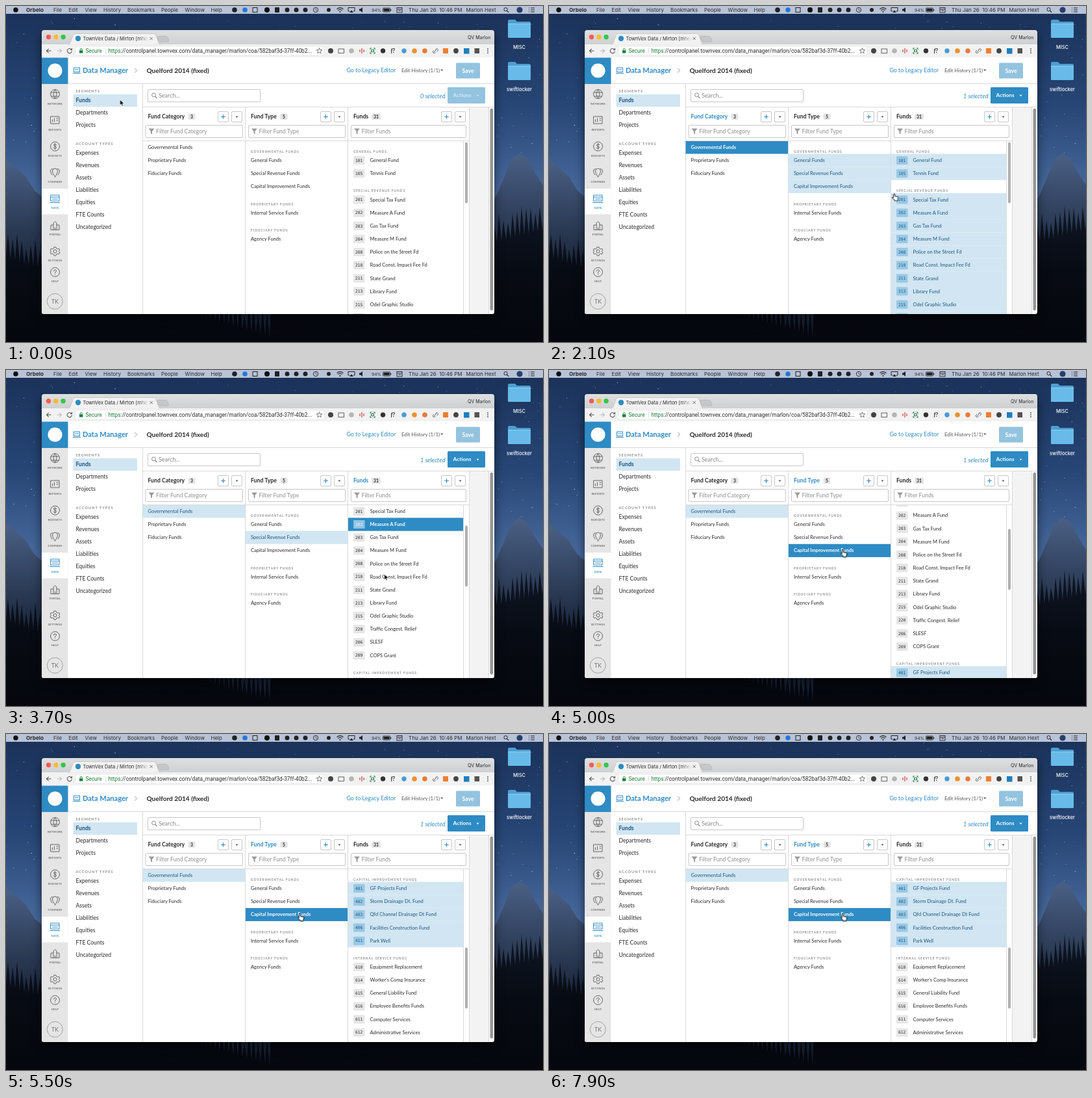
These frames come from a looping animation (827 by 517 pixels, 8000 ms). An HTML page:

```html
<!DOCTYPE html>
<html lang="en">
<head>
<meta charset="utf-8">
<title>Data Manager</title>
<style>
html, body { margin: 0; width: 100%; height: 100%; overflow: hidden; background: #05080f; }
svg { display: block; width: 827px; height: 517px; font-family: Lato, sans-serif; fill: none; }
text { fill: #2b2b2b; white-space: pre; }
.b { font-weight: 700; }
.i { font-style: italic; }
.mid { text-anchor: middle; }
.end { text-anchor: end; }
.ui { font-family: Inter, sans-serif; }
.url { font-family: Roboto, sans-serif; }
.mono { font-family: "DejaVu Sans Mono", monospace; }
.caps { font-weight: 700; fill: #8b8b8b; letter-spacing: 1px; }
.icon { stroke: #666; stroke-width: 1; stroke-linejoin: round; stroke-linecap: round; }
.row .bg { fill: var(--bg); }
.row .tag { fill: var(--tag); }
.row text { fill: var(--fg); }
.row .name { font-weight: var(--w); }
.head { fill: var(--fg); font-weight: 700; }
.scroll { animation: scroll 8s infinite cubic-bezier(.37,0,.63,1); }
.thumb { animation: thumb 8s infinite cubic-bezier(.37,0,.63,1); }
.cursor { animation: move 8s infinite ease-in-out; }
.on { animation: on 8s step-end infinite; }
.off { animation: off 8s step-end infinite; }
.arrow { animation: arrow 8s step-end infinite; }
.hand { animation: hand 8s step-end infinite; }
@keyframes scroll {
  0%, 39.5% { transform: translateY(0); }
  45.75%, 61.55% { transform: translateY(-80.6px); }
  67.8%, 100% { transform: translateY(-322.4px); }
}
@keyframes thumb {
  0%, 39.5% { transform: translateY(0); }
  45.75%, 61.55% { transform: translateY(29.8px); }
  67.8%, 100% { transform: translateY(119px); }
}
@keyframes move {
  0%, 5% { transform: translate(175.5px, 144px); }
  14% { transform: translate(262px, 216px); }
  19.5% { transform: translate(262px, 216px); animation-timing-function: ease-in; }
  26.25% { transform: translate(531.5px, 288.5px); animation-timing-function: ease-out; }
  31%, 51% { transform: translate(582.5px, 314px); }
  58.5%, 100% { transform: translate(452.5px, 276.5px); }
}
@keyframes on { 0% { opacity: 0; } 16.25%, 100% { opacity: 1; } }
@keyframes off { 0% { opacity: 1; } 16.25%, 100% { opacity: 0; } }
@keyframes arrow { 0% { opacity: 1; } 13% { opacity: 0; } 42.5% { opacity: 1; } 52%, 100% { opacity: 0; } }
@keyframes hand { 0% { opacity: 0; } 13% { opacity: 1; } 42.5% { opacity: 0; } 52%, 100% { opacity: 1; } }
</style>
</head>
<body>
<svg id="stage" viewBox="0 0 827 517">
  <defs>
    <linearGradient id="sky" x2="0" y2="1">
      <stop offset="0" stop-color="#1a3158"/><stop offset=".3" stop-color="#274676"/>
      <stop offset=".55" stop-color="#48699c"/><stop offset=".75" stop-color="#40597f"/>
      <stop offset="1" stop-color="#0a1120"/>
    </linearGradient>
    <linearGradient id="rock" x2="0" y2="1">
      <stop offset="0" stop-color="#4a6085"/><stop offset="1" stop-color="#141e30"/>
    </linearGradient>
    <linearGradient id="ground" x2="0" y2="1">
      <stop offset="0" stop-color="#101826"/><stop offset=".5" stop-color="#070b13"/>
      <stop offset="1" stop-color="#05070d"/>
    </linearGradient>
    <linearGradient id="fade"><stop stop-color="#f2f2f2" stop-opacity="0"/><stop offset="1" stop-color="#f2f2f2"/></linearGradient>
    <linearGradient id="bar" x2="0" y2="1"><stop stop-color="#dedfe0"/><stop offset="1" stop-color="#cfd0d2"/></linearGradient>
    <filter id="shadow" x="-10%" y="-10%" width="120%" height="125%"><feGaussianBlur stdDeviation="8"/></filter>
    <clipPath id="win"><path d="M55 41a4 4 0 0 1 4-4h689a4 4 0 0 1 4 4v430a3 3 0 0 1-3 3H58a3 3 0 0 1-3-3z"/></clipPath>
    <clipPath id="list"><path d="M527 208h178v266h-178z"/></clipPath>
    <clipPath id="tab"><path d="M110 40h109v18h-109z"/></clipPath>
  </defs>
</svg>
<script>
const BLUE = '#2e8bc4', PALE = '#d1e6f2', LINE = '#d9d9d9';
const T = (x, y, s, size, cls = '', more = '') =>
  `<text x="${x}" y="${y}" font-size="${size}" class="${cls}" ${more}>${s}</text>`;
const R = (x, y, w, h, fill, more = '') =>
  `<rect x="${x}" y="${y}" width="${w}" height="${h}" fill="${fill}" ${more}/>`;
const C = (x, y, r, fill, more = '') => `<circle cx="${x}" cy="${y}" r="${r}" fill="${fill}" ${more}/>`;
const P = (d, more = '') => `<path d="${d}" ${more}/>`;
const box = (x, y, w, h, stroke = '#c6c6c6') => R(x, y, w, h, '#fff', `stroke="${stroke}" rx="1.5"`);
const fill = c => `fill="${c}"`;
const line = (c, w = 1) => `stroke="${c}" stroke-width="${w}"`;

// Row looks (plain, lit, chosen, blue heading) over four phases of the loop.
const looks = [
  '--bg:transparent;--fg:#2b2b2b;--tag:#e6e6e6;--w:400',
  `--bg:${PALE};--fg:#1d5580;--tag:#98c8e5;--w:400`,
  `--bg:${BLUE};--fg:#fff;--tag:#8fc3e3;--w:700`,
  `--fg:${BLUE}`
];
const starts = [0, 16.25, 38.75, 61.25];
const used = new Set();
const phase = p => (used.add(p), 'p' + p);
const phaseCss = p => `@keyframes p${p}{${[...p].map((d, i) => `${starts[i]}%{${looks[d]}}`).join('')}` +
  `100%{${looks[p[3]]}}}.p${p}{animation:p${p} 8s step-end infinite}`;

function wallpaper() {
  let seed = 7;
  const rnd = () => (seed = (seed * 16807) % 2147483647) / 2147483647;
  let out = R(0, 0, 827, 517, 'url(#sky)');
  for (let i = 0; i < 420; i++)
    out += C((rnd() * 827).toFixed(1), (rnd() * 250).toFixed(1), (.25 + rnd() * .45).toFixed(2), '#cfdcf2', `opacity="${(.3 + rnd() * .6).toFixed(2)}"`);
  out += P('M0 236L14 248L30 262L44 284L60 298V420H0z', fill('url(#rock)'));
  out += P('M740 318L756 290L768 262L778 236L790 227L803 234L813 254L827 276V420H740z', fill('url(#rock)'));
  let d = 'M0 517V385';
  for (let x = 0; x < 827; x += 7) {
    const y = x < 400 ? 378 + x * .3 : 350 - (x - 752) * .25;
    d += `L${x + 3} ${(y - 12 - rnd() * 22).toFixed(1)}L${x + 7} ${(y + 12).toFixed(1)}`;
  }
  return out + P(d + 'V517z', fill('url(#ground)'));
}

function folder(y, name) {
  return P(`M773 ${y + 4}v-2a2 2 0 0 1 2-2h9l3 3h19a2 2 0 0 1 2 2v4h-35z`, fill('#4c9fd2')) +
    R(773, y + 6, 35, 22, '#68bbe8', 'rx="1.5"') + R(773, y + 6, 35, 1, '#8fd0f2') +
    T(790.5, y + 45, name, 7.4, 'ui mid', 'style="fill:#fff;font-weight:500"');
}

function menuBar() {
  let out = R(0, 0, 827, 12, '#b9c3d6') + C(15, 6, 3.8, '#111') + T(31, 9, 'Orbelo', 8.2, 'ui b');
  const menu = { File: 73, Edit: 96.5, View: 121.5, History: 150, Bookmarks: 187, People: 239, Window: 275.5, Help: 315.5 };
  for (const k in menu) out += T(menu[k], 9, k, 7.95, 'ui');
  out += C(352, 6, 3.8, '#222') + C(368, 6, 3.8, '#2378d8');
  out += R(380, 2.5, 7, 7, 'none', line('#222')) + C(402, 6, 4, '#111') + R(414, 2, 7, 8, '#222', 'rx="1"');
  [433, 447, 461].forEach(x => out += C(x, 6, 3.5, '#222'));
  out += C(477, 6, 3.7, 'none', line('#333')) + P('M477 3.5V6l2 1', line('#333', .8)) + C(497, 6, 3, '#222');
  out += P('M509.5 4.8q5-4.4 10 0M511.2 6.8q3.3-2.8 6.6 0', line('#222', 1.1)) + C(514.5, 9, 1.1, '#222');
  out += P('M529 8h-2V2.5h10V8h-2', line('#222')) + P('M532 6.5l3 3.5h-6z', fill('#222'));
  out += P('M544 4.5h2l3-2.5v8l-3-2.5h-2z', fill('#222')) + T(563, 8.7, '94%', 6.7, 'ui');
  out += R(580.5, 3, 11, 6.2, 'none', line('#222', .8) + ' rx="1"') + R(581.5, 4, 9, 4.2, '#222') + R(592.3, 4.8, 1, 2.6, '#222');
  out += R(602, 2.5, 8, 7.5, 'none', line('#222', .9)) + P('M602 5h8M604.5 7h3.5', line('#222', .9));
  out += T(620, 9, 'Thu Jan 26  10:46 PM', 8, 'ui') + T(708.5, 9, 'Marlon Hext', 8, 'ui');
  out += C(769.5, 5.2, 2.6, 'none', line('#222')) + P('M771.5 7.2l2.7 2.7', line('#222', 1.2)) + C(791, 6, 4.6, '#27406f');
  return out + P('M805 3h1M808 3h6M805 6h1M808 6h6M805 9h1M808 9h6', line('#222', 1.1));
}

function browser() {
  let out = R(55, 37, 697, 22, 'url(#bar)') + R(55, 59, 697, 20.5, '#f2f2f2');
  ['#fc5b57', '#fdbb2f', '#33c748'].forEach((c, i) => out += C(65.5 + i * 11.3, 47.8, 3.7, c));
  out += P('M95 59.5q3 0 4-3l4-11q1-3 4-3h120q3 0 4 3l4 11q1 3 4 3z', fill('#f2f2f2') + line('#b5b5b5', .6));
  out += R(94, 59.2, 150, 2, '#f2f2f2') + C(111, 50, 4.2, BLUE);
  out += `<g clip-path="url(#tab)">${T(118.5, 52.7, 'TownVex Data / Mirton [mhext]', 7.4, 'ui')}</g>` + R(203, 44, 17, 12, 'url(#fade)');
  out += P('M221.5 47.8l4.4 4.4m0-4.4l-4.4 4.4', line('#666', .9));
  out += P('M234 46.5h12q2 0 3 2l2 4.5q.5 2-1.500 2h-12q-2 0-2.500-2l-2-4.500q-.5-2 1-2z', fill('#c6c7c9') + line('#adadad', .6));
  out += T(746.5, 50.5, 'QV Marlon', 7.1, 'ui end');
  out += P('M69.500 69h-7m3.200-3.200L62.500 69l3.200 3.200', line('#555', 1.1)) + P('M78.500 69h7m-3.200-3.200L85.500 69l-3.200 3.200', line('#bbb', 1.1));
  out += P('M100.800 67a3.600 3.600 0 1 0 .6 2.500M101.500 65v2.500H99', line('#555', 1.1));
  out += R(107, 62, 383, 14, '#fff', line('#ddd', .6) + ' rx="2"');
  out += R(113, 68.300, 5.400, 4.200, '#188038', 'rx=".5"') + P('M114.200 68.500v-1.500a1.500 1.500 0 0 1 3 0v1.500', line('#188038', .9));
  out += T(122.5, 71.8, 'Secure', 8.2, 'url', 'style="fill:#188038"') + P('M153.500 64.500v9', line('#ddd'));
  out += T(157.500, 71.8, '<tspan fill="#188038">https</tspan>://controlpanel.townvex.com/data_manager/marlon/coa/582baf3d-37ff-40b2...', 8.4, 'url');
  out += P('M482.500 64.600l1.200 2.900 3.100.2-2.400 2 .8 3-2.700-1.600-2.700 1.600.8-3-2.400-2 3.100-.2z', line('#555', .8));
  out += C(500, 69, 4, '#444') + R(512, 66, 8.500, 6.500, 'none', line('#666')) + C(532, 69, 3.8, '#b5b5b5');
  out += P('M545 67v4M548 65v8M551 67v4', line('#d5504a', 1.3)) + P('M561 67v-2h2M566 65h2v2M568 71v2h-2M563 73h-2v-2M562.500 67.500h4v3h-4z', line('#2e7d4f', 1.1));
  out += C(580.500, 69, 3.7, '#333') + T(592.500, 72, 'f?', 8.500, 'i b') + C(613, 69, 3.7, '#4a9ad4') + C(629, 69, 3.8, '#e8922f') + C(645, 69, 3.8, '#ec7a35');
  out += P('M659 71l4-4M659 68l-1.200 1.200a1.900 1.900 0 0 0 2.700 2.700l1.200-1.200M661 67.500l1.200-1.200a1.900 1.900 0 0 1 2.700 2.700L663.500 70.200', line('#555', .9));
  out += R(673, 65, 8, 8, '#ef7d32') + C(693, 69, 3.9, '#444') + R(705, 65, 8.500, 8.500, '#1d7fbf') + R(721.500, 65, 7.500, 8, '#555');
  return out + [66, 69, 72].map(y => C(742, y, .9, '#555')).join('');
}

function rail() {
  let out = R(55, 120, 40.500, 354, '#e5e5e5') + R(55, 79.500, 40.500, 40.500, BLUE) + C(75.500, 99.500, 11, '#fff') + R(55, 281, 40.500, 39.500, '#fff');
  const icons = [
    'M68.500 135.500a7 7 0 1 0 14 0a7 7 0 1 0-14 0M69 133h13M70 139h11M75.500 128.500q-5 7 0 14q5-7 0-14',
    'M69 170h13v11H69zM71.500 178v-3M74.500 178v-5M78 173h2M78 176h2',
    'M68.500 216a7 7 0 1 0 14 0a7 7 0 1 0-14 0M77.800 213.500q-4-2-4.500.7c0 2 4.500 1.200 4.500 3.400q-.8 2.500-4.800.6M75.500 211.500v9',
    'M75.500 263q-4-6-4-9a4 4 0 0 1 8 0q0 3-4 9M71 260q-3-4-2.500-7q.5-2 3-2.500M80 260q3-4 2.500-7q-.5-2-3-2.500',
    'M69 291h13v9H69zM69 294h13M68 302.500h15M71.500 297h8',
    'M69 344v-7h4v-3l2.500-2.500 2.500 2.500v3h4v7zM73 344v-7M78 344v-7M75.500 344v-3',
    'M73 377.500a2.500 2.500 0 1 0 5 0a2.500 2.500 0 1 0-5 0M74 371h3l.6 2 2.200 1 2-.6 1 2.600-1.500 1.500 1.500 1.600-1 2.600-2-.6-2.200 1-.6 2h-3l-.6-2-2.200-1-2 .6-1-2.600 1.500-1.600-1.500-1.500 1-2.600 2 .6 2.200-1z',
    'M68.500 409.500a7 7 0 1 0 14 0a7 7 0 1 0-14 0M73.500 408q0-2 2-2t2 1.800q0 1-2 2.200v1M75.500 413v.2'
  ];
  const labels = ['NETWORK', 'REPORTS', 'BUDGETS', 'COMPARE', 'DATA', 'PORTAL', 'SETTINGS', 'HELP'];
  const ys = [151.500, 191.500, 231.700, 272, 312, 352.500, 392.800, 425];
  labels.forEach((s, i) => {
    const c = i === 4 ? BLUE : '#666';
    out += P(icons[i], `class="icon" style="stroke:${c}"`) + T(75.500, ys[i], s, 4.100, 'b mid', `style="fill:${c};letter-spacing:.3px"`);
  });
  return out + C(75.300, 454.500, 12, 'none', line('#999', .9)) + T(75.300, 457.700, 'TK', 9, 'mid', 'style="fill:#777"');
}

function page() {
  let out = R(55, 79, 697, 395, '#fff') + rail();
  out += R(104.500, 95, 9, 6.500, 'none', line(BLUE)) + P('M103 103.500h12M106 98h6', line(BLUE));
  out += T(118, 103, 'Data Manager', 11.100, 'b', `style="fill:${BLUE}"`) + P('M198.500 96l3 3.300-3 3.300', line('#999'));
  out += T(216.500, 102.600, 'Quelford 2014 (fixed)', 10.100, 'b');
  out += T(524.500, 102.200, 'Go to Legacy Editor', 8.800, '', `style="fill:${BLUE}"`) + T(609, 102.200, 'Edit History (1/1)', 7.800, '', 'style="fill:#555"');
  out += P('M669 97.500h4.500l-2.250 2.800z', fill('#666')) + R(693, 87.500, 37, 24, '#93c3df', 'rx="1.500"') + T(711.500, 102.500, 'Save', 8.700, 'b mid', 'style="fill:#fff"');
  out += P('M95.500 119.500H752M210.500 120V474M211 155.500H752', line(LINE));

  out += T(107.500, 132.800, 'SEGMENTS', 5.600, 'caps') + T(107.500, 213.800, 'ACCOUNT TYPES', 5.600, 'caps') + R(103.500, 136, 98.500, 19, PALE);
  out += T(107.500, 148.100, 'Funds', 8.700, 'b', 'style="fill:#1d4f7a"');
  ['Departments', 'Projects'].forEach((s, i) => out += T(107.500, 167.100 + i * 19, s, 8.600));
  ['Expenses', 'Revenues', 'Assets', 'Liabilities', 'Equities', 'FTE Counts', 'Uncategorized']
    .forEach((s, i) => out += T(107.500, 229.100 + i * 19, s, 8.600));

  out += box(218.500, 128.500, 173, 19) + C(227.500, 136.800, 2.900, 'none', line('#888')) + P('M229.600 139l2.900 2.900', line('#888', 1.200));
  out += T(235, 141, 'Search...', 9, '', 'style="fill:#888"');
  ['off', 'on'].forEach((cls, i) => {
    const act = cls === 'on';
    out += `<g class="${cls}">${T(676.500, 142, i + ' selected', 9.200, 'i end', `style="fill:${BLUE}"`)}` +
      R(680, 125, 58, 25, act ? BLUE : '#93c3df', 'rx="1.500"') +
      `<g opacity="${act ? 1 : .6}">${T(688.500, 140.300, 'Actions', 8.300, 'b', 'style="fill:#fff"')}${P('M724.500 136.800h4l-2 2.500z', fill('#fff'))}</g></g>`;
  });
  return out;
}

const slot = i => 217.4 + 20.15 * i;

function row(x, w, i, name, p, code) {
  const y = slot(i), tx = code ? x + 33.500 : x + 8;
  return `<g class="row ${phase(p)}">${R(x, y - 10.100, w, 20.200, 'none', 'class="bg"')}` +
    (code ? R(x + 8, y - 6.500, 17.500, 13, 'none', 'class="tag" rx="1"') + T(x + 16.700, y + 2.300, code, 6.300, 'mono mid') : '') +
    T(tx, y + 2.600, name, 7.550, 'name') + '</g>';
}

// Groups are lists of [title, phases, names]; a title takes one slot, as does each row.
function groups(x, w, list) {
  let i = 0, out = '';
  for (const [title, p, names] of list) {
    out += T(x + 8, slot(i++) + 8.500, title, 4.800, 'caps');
    for (const item of names.split('|')) {
      const [, code, name, own] = item.match(/^(\d{3} )?([^@]+)@?(.*)$/);
      out += row(x, w, i++, name, own || p, code && code.trim());
    }
  }
  return out;
}

function column(x, right, title, count, tagX, p) {
  let out = T(x + 8, 173, title, 8.700, 'head ' + phase(p)) + R(tagX, 165.500, count.length > 1 ? 14 : 11, 9.500, '#e4e4e4', 'rx="2"');
  out += T(tagX + (count.length > 1 ? 7 : 5.500), 172.800, count, 6.800, 'b mid');
  const a = right - 38, b = right - 17;
  out += box(a, 162.500, 16, 16) + P(`M${a + 4.700} 170.500h6.600M${a + 8} 167.200v6.600`, line(BLUE, 1.200));
  out += box(b, 162.500, 16, 16) + P(`M${b + 6} 169.500h4l-2 2.500z`, fill('#555'));
  out += box(x + 4.500, 183.500, right - x - 4.500, 19) + P(`M${x + 9} 188.500h9l-3.500 4.300v4.700l-2-1.500v-3.200z`, fill('#999'));
  return out + T(x + 20.500, 196, 'Filter ' + title, 8.750, '', 'style="fill:#909090"');
}

function columns() {
  let out = R(714, 156, 29, 318, '#f3f3f3') + column(210.500, 364.500, 'Fund Category', '3', 280.500, '0300') +
    column(369, 522.500, 'Fund Type', '5', 422.500, '0003') + column(527, 708.500, 'Funds', '31', 563, '0030');
  ['Governmental Funds', 'Proprietary Funds', 'Fiduciary Funds'].forEach((s, i) => out += row(210.500, 158, i, s, i ? '0000' : '0211'));
  out += groups(369, 157.500, [
    ['GOVERNMENTAL FUNDS', '0100', 'General Funds|Special Revenue Funds@0110|Capital Improvement Funds@0102'],
    ['PROPRIETARY FUNDS', '0000', 'Internal Service Funds'],
    ['FIDUCIARY FUNDS', '0000', 'Agency Funds']
  ]);
  out += `<g clip-path="url(#list)"><g class="scroll">${groups(527, 177.500, [
    ['GENERAL FUNDS', '0100', '101 General Fund|105 Tennis Fund'],
    ['SPECIAL REVENUE FUNDS', '0100', '201 Special Tax Fund|202 Measure A Fund@0120|203 Gas Tax Fund|204 Measure M Fund|208 Police on the Street Fd|210 Road Const. Impact Fee Fd|211 State Grand|213 Library Fund|215 Odel Graphic Studio|220 Traffic Congest. Relief|206 SLESF|209 COPS Grant'],
    ['CAPITAL IMPROVEMENT FUNDS', '0101', '401 GF Projects Fund|402 Storm Drainage Dt. Fund|403 Qfd Channel Drainage Dt Fund|406 Facilities Construction Fund|411 Park Well'],
    ['INTERNAL SERVICE FUNDS', '0000', "610 Equipment Replacement|614 Worker's Comp Insurance|615 General Liability Fund|616 Employee Benefits Funds|611 Computer Services|612 Administrative Services"]
  ])}</g></g>`;
  out += P('M211 207.500H713M368.500 156V474M526.500 156V474M713.500 156V474M743.500 156V474M704.500 208V474', line(LINE));
  out += R(707, 209.500, 4, 94, '#b0b0b0', 'rx="2" class="thumb"');
  return out + R(745.500, 157.500, 4.500, 311, '#969696', 'rx="2.200"');
}

const cursor = `<g class="cursor">
  ${P('M0 0v8.800l2-1.900 1.400 3.200 1.600-.7-1.400-3.100h2.800z', 'class="arrow" fill="#000" stroke="#fff" stroke-width=".8"')}
  ${P('M-1.200 1q1.100-1.500 2.100 0v3l4 .8q1.300.4 1.200 1.800l-.7 2.700v1.700h-5v-1.300L-3.300 6.800q-.2-1.700 1.300-1.100l.8.700z', 'class="hand" fill="#fff" stroke="#000" stroke-width=".9" stroke-linejoin="round"')}
</g>`;

const body = wallpaper() + menuBar() + folder(21, 'MISC') + folder(86, 'swiftlocker') +
  R(55, 44, 697, 436, '#000', 'opacity=".55" filter="url(#shadow)"') +
  `<g clip-path="url(#win)">${browser()}${page()}${columns()}</g>` + cursor;
const style = document.createElement('style');
style.textContent = [...used].map(phaseCss).join('\n');
document.head.append(style);
document.getElementById('stage').insertAdjacentHTML('beforeend', body);
</script>
</body>
</html>
```
